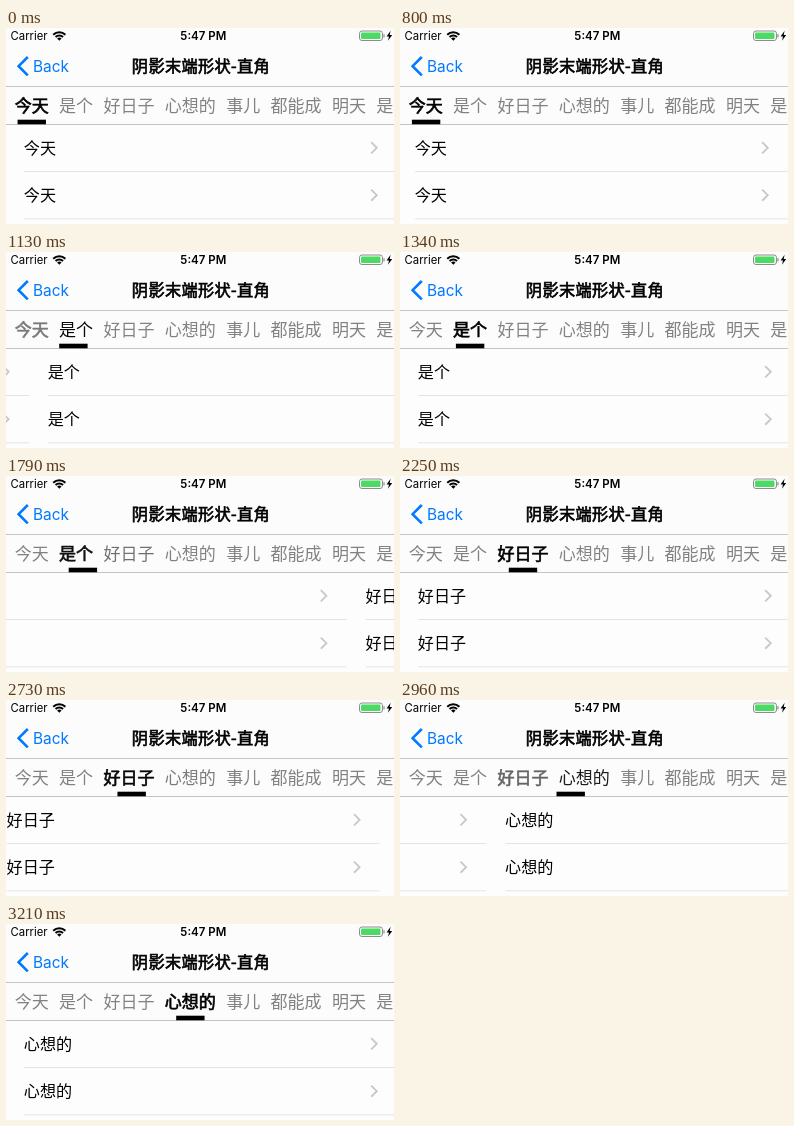
Recreate the animation shown at these times as an HTML page with a canvas. Size 388 px wide and 196 px high, loop 4000 ms.

```html
<!DOCTYPE html>
<html lang="zh-CN">
<head>
<meta charset="utf-8">
<title>Tab pager</title>
<style>
  html, body { margin: 0; width: 100%; height: 100%; overflow: hidden; background: #fdfdfd; }
  canvas { display: block; width: 388px; height: 196px; }
</style>
</head>
<body>
<canvas id="stage"></canvas>
<script>
const W = 388, H = 196, LOOP = 4000;
const PAGE = 392, PAGE_LEFT = -1, ROW = 47.35;
const CJK = '"Noto Sans CJK SC", "Noto Sans CJK", sans-serif';
const LATIN = 'Inter, Roboto, sans-serif';
const BLUE = '#007aff', SEMIBOLD = 0.65;

const canvas = document.getElementById('stage');
const ratio = window.devicePixelRatio || 1;
canvas.width = W * ratio;
canvas.height = H * ratio;
const ctx = canvas.getContext('2d');
ctx.scale(ratio, ratio);
ctx.lineJoin = 'miter';

// Tabs laid out left to right from their character count.
const EM = 17.05, GAP = 10.25;
let left = 8.7;
const tabs = ['今天', '是个', '好日子', '心想的', '事儿', '都能成', '明天', '是个'].map(label => {
  const tab = { label, x: left, mid: left + label.length * EM / 2 };
  left += label.length * EM + GAP;
  return tab;
});

// Each swipe settles like a critically damped spring, redrawn at the listed steps (ms).
const swipes = [
  { start: 800, phase: 0.13, rate: 13.25, steps: [0, 60, 120, 180, 240, 300, 330, 360, 420, 480, 540] },
  { start: 1790, phase: 0.62, rate: 12.35, steps: [0, 60, 120, 180, 240, 280, 310, 370, 430, 460] },
  { start: 2730, phase: 0.33, rate: 14, steps: [0, 60, 90, 150, 180, 240, 300, 330, 390, 420, 480] }
];

// Returns the page the swipe left and its progress towards the next one.
function pose(t) {
  let page = 0;
  for (const { start, phase, rate, steps } of swipes) {
    const dt = t - start;
    if (dt < 0) break;
    if (dt < steps[steps.length - 1]) {
      const shown = steps.filter(s => s <= dt).pop();
      const x = phase + rate * shown / 1000;
      return { page, part: 1 - (1 + x) * Math.exp(-x) };
    }
    page++;
  }
  return { page, part: 0 };
}

// An outline thickens regular glyphs to weights between regular and bold.
function text(str, x, y, size, options = {}) {
  const { family = CJK, weight = 400, color = '#000', align = 'left', outline = 0, spacing = 0 } = options;
  ctx.font = `${weight} ${size}px ${family}`;
  ctx.letterSpacing = `${spacing}px`;
  ctx.textAlign = align;
  ctx.fillStyle = ctx.strokeStyle = color;
  ctx.fillText(str, x, y);
  if (outline) {
    ctx.lineWidth = outline;
    ctx.strokeText(str, x, y);
  }
}

function rect(x, y, w, h, color) {
  ctx.fillStyle = color;
  ctx.fillRect(x, y, w, h);
}

function path(points, width, color) {
  ctx.beginPath();
  points.forEach(([x, y]) => ctx.lineTo(x, y));
  ctx.lineWidth = width;
  ctx.strokeStyle = color;
  ctx.stroke();
}

function wifi(x, y) {
  const a = Math.PI / 4;
  ctx.strokeStyle = '#000';
  ctx.lineWidth = 2;
  for (const r of [5.3, 8.6]) {
    ctx.beginPath();
    ctx.arc(x, y, r, -Math.PI / 2 - a, -Math.PI / 2 + a);
    ctx.stroke();
  }
  ctx.beginPath();
  ctx.moveTo(x, y);
  ctx.arc(x, y, 3.2, -Math.PI / 2 - a, -Math.PI / 2 + a);
  ctx.fillStyle = '#000';
  ctx.fill();
}

function battery() {
  ctx.beginPath();
  ctx.roundRect(353.5, 3, 23, 9.5, 2.5);
  ctx.lineWidth = 1;
  ctx.strokeStyle = '#8c8c8c';
  ctx.stroke();
  ctx.beginPath();
  ctx.roundRect(355, 4.5, 19.5, 6.5, 1.2);
  ctx.fillStyle = '#4cd964';
  ctx.fill();
  rect(377.4, 6.2, 1.2, 3.2, '#8c8c8c');
  ctx.beginPath();
  [[384.6, 2.8], [380.6, 8.4], [383, 8.4], [382, 12.8], [386.2, 6.9], [383.7, 6.9]]
    .forEach(([x, y]) => ctx.lineTo(x, y));
  ctx.fillStyle = '#000';
  ctx.fill();
}

function header() {
  rect(0, 0, W, 96, '#fcfcfc');
  text('Carrier', 4.6, 12.2, 11.3, { family: LATIN });
  wifi(53.3, 12.8);
  text('5:47 PM', 197.3, 12.2, 11.5, { family: LATIN, weight: 600, align: 'center' });
  battery();
  path([[21.8, 29], [12.6, 38.2], [21.8, 47.4]], 2.6, BLUE);
  text('Back', 27, 43.7, 15.4, { family: LATIN, color: BLUE });
  text('阴影末端形状-直角', 195, 44, 16.2, { outline: SEMIBOLD, spacing: 0.35, align: 'center' });
  rect(0, 58, W, 1, '#c4c4c4');
}

function tabBar(page, part) {
  tabs.forEach(({ label, x }, i) => {
    const active = i === page ? 1 - part : i === page + 1 ? part : 0;
    const shade = Math.round(130 * (1 - active));
    text(label, x, 84, EM, {
      outline: i === page ? SEMIBOLD : 0,
      color: `rgb(${shade},${shade},${shade})`
    });
  });
  rect(0, 96, W, 1, '#c4c4c4');
  const from = tabs[page].mid, to = tabs[page + 1].mid;
  rect(from + (to - from) * part - 14.2, 91.7, 28.4, 4.6, '#000');
}

function list(label, x) {
  for (let row = 0; row < 2; row++) {
    const mid = 119.8 + row * ROW;
    text(label, x + 18.8, mid + 6.2, 16.1);
    path([[x + 366.2, mid - 5.6], [x + 371.8, mid], [x + 366.2, mid + 5.6]], 1.8, '#c7c7cc');
    rect(x + 19, 143 + row * ROW, PAGE - 19, 1, '#e4e4e6');
  }
}

function draw(t) {
  const { page, part } = pose(t);
  rect(0, 0, W, H, '#fdfdfd');
  const x = PAGE_LEFT - part * PAGE;
  list(tabs[page].label, x);
  if (part) list(tabs[page + 1].label, x + PAGE);
  header();
  tabBar(page, part);
}

const began = performance.now();
function tick() {
  draw((performance.now() - began) % LOOP);
  requestAnimationFrame(tick);
}
tick();
</script>
</body>
</html>
```
